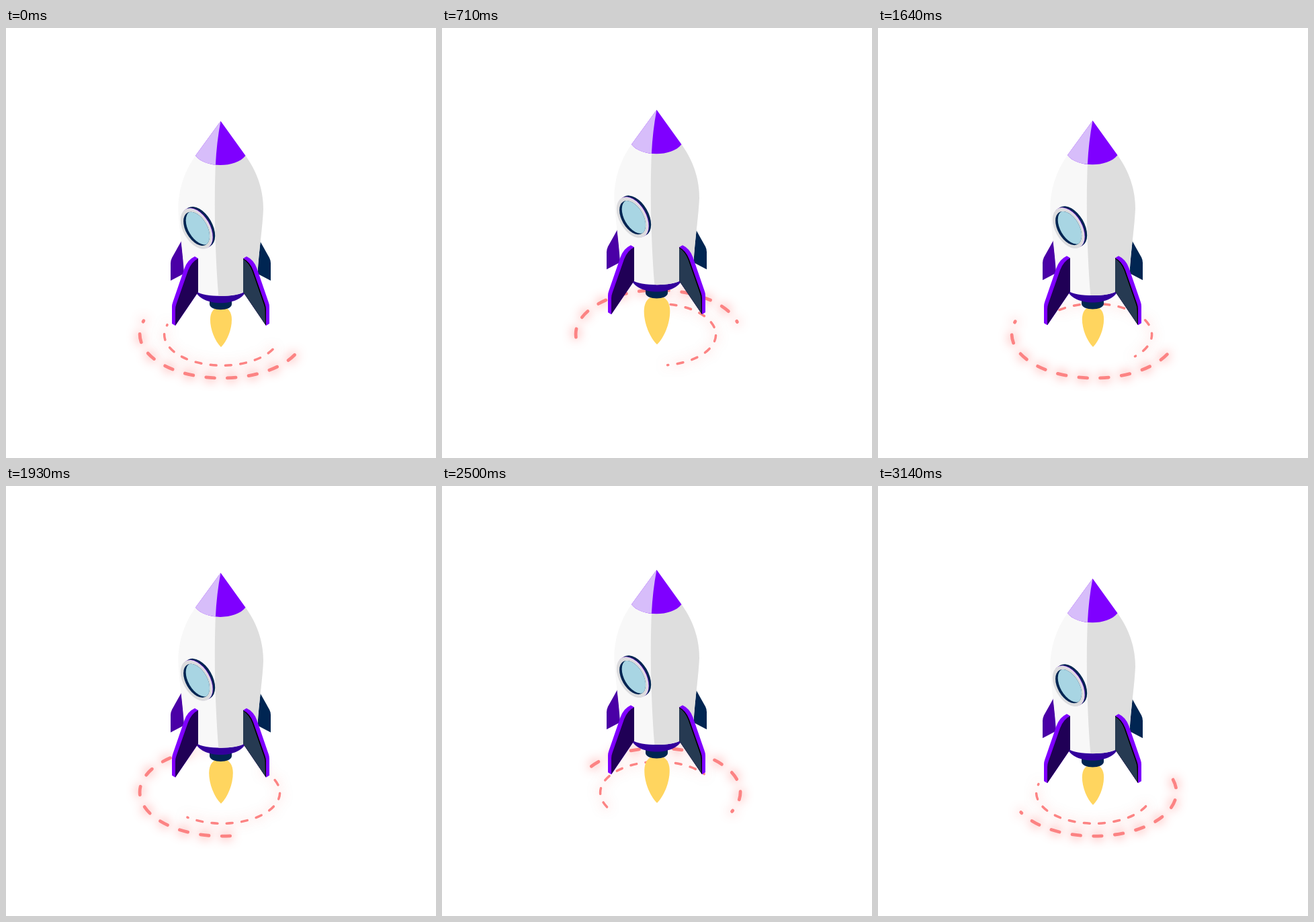
An HTML page with a canvas for the animation above (3210 ms loop, 640 px wide and 640 px high).

```html
<!DOCTYPE html>
<html lang="en">
<head>
<meta charset="utf-8">
<title>Rocket</title>
<style>
html, body { margin: 0; width: 100%; height: 100%; overflow: hidden; background: #fff; }
canvas { display: block; width: 640px; height: 640px; }
</style>
</head>
<body>
<canvas id="stage" width="640" height="640"></canvas>
<script>
const ctx = document.getElementById('stage').getContext('2d');
const LOOP = 3210, STEPS = 45, STEP = LOOP / STEPS, LEAD = 4;
const MID = 319.5, LIFT = 17;
const PURPLE = '#7f00ff', NAVY = '#002552';

function fill(color, d) {
  ctx.fillStyle = color;
  ctx.fill(new Path2D(d));
}

function mirrored(draw) {
  ctx.save();
  ctx.translate(2 * MID, 0);
  ctx.scale(-1, 1);
  draw();
  ctx.restore();
}

// Half a ring of dashes; turn is in degrees of arc length.
function ring(scale, cy, turn, width, glow) {
  const rx = 122.5 * scale, ry = 65.5 * scale;
  const h = ((rx - ry) / (rx + ry)) ** 2;
  const total = Math.PI * (rx + ry) * (1 + 3 * h / (10 + Math.sqrt(4 - 3 * h)));
  const pitch = total / 19, dash = 12.6 * scale, stub = 1.7 * scale;
  const pattern = [];
  for (let i = 0; i < 9; i++) pattern.push(dash, pitch - dash);
  pattern.push(stub, total - 9 * pitch - stub);

  ctx.save();
  ctx.lineWidth = width;
  ctx.lineCap = 'round';
  ctx.strokeStyle = '#fc8383';
  ctx.shadowColor = `rgba(248, 85, 80, ${glow})`;
  ctx.shadowBlur = 16;
  ctx.setLineDash(pattern);
  ctx.lineDashOffset = -(turn % 360) / 360 * total;
  ctx.beginPath();
  ctx.ellipse(321.6, cy, rx, ry, 0, 0, Math.PI * 2);
  ctx.stroke();
  ctx.restore();
}

function flame(lift) {
  ctx.save();
  ctx.translate(MID + 0.5, 413 - LIFT * lift);
  const size = 1 + 0.21 * lift;
  ctx.scale(size, size);
  fill('#ffd55f', 'M0 62 C-9 53 -16 36 -16 21 C-16 10 -11 2 0 2 C11 2 16 10 16 21 C16 36 9 53 0 62Z');
  ctx.restore();
}

function oval(x, y, a, b) {
  ctx.beginPath();
  ctx.ellipse(x, y, a, b, Math.PI / 3, 0, Math.PI * 2);
}

function porthole() {
  const disc = (color, x, y, a, b) => {
    oval(x, y, a, b);
    ctx.fillStyle = color;
    ctx.fill();
  };
  disc(NAVY, 287.6, 296.2, 33, 19.5);
  disc('#5a16a8', 284.7, 297.9, 33, 19.5);
  disc('#ead8f8', 284, 298.4, 33, 19.5);
  disc('#dcdcde', 283.2, 298.9, 32.8, 19.3);
  disc(NAVY, 283.6, 298.9, 27.5, 16);
  ctx.save();
  oval(283.6, 298.9, 27.5, 16);
  ctx.clip();
  disc('#a8d5e3', 287.2, 297.4, 27.5, 16);
  ctx.restore();
}

function backFin(color) {
  fill(color, 'M261 317 L247 342 Q245 346 245 350 L245 376 L266 365Z');
}

function frontFin(face, seam) {
  const inner = 'M286 343 Q276 348 271 361 L253.5 411 Q252 415 252 419 L252 443 L286 393Z';
  fill(PURPLE, 'M281 340 Q270 345 265.5 358 L248.3 408 Q247 411.5 247 415 L247 440 L252 443 L286 393 L286 343Z');
  if (seam) {
    fill(seam, inner);
    fill(face, 'M286 344 Q277 350 272.6 361.5 L255 412 Q253.5 416 253.5 420 L253 441.5 L286 393Z');
  } else {
    fill(face, inner);
  }
}

function rocket() {
  backFin('#4a00a6');
  mirrored(() => backFin(NAVY));

  fill(NAVY, 'M303 404 L303 411 C303 422 336 422 336 411 L336 404Z');
  fill('#33009c', 'M282 388 L282 392 C292 415 347 415 357 392 L357 388Z');

  fill('#f8f8f8', 'M356.5 190 C377 219 383 246 383 270 C381.5 300 376.5 330 374.5 365 L356.5 392 ' +
    'C343 401.2 296 401.2 282.5 392 L265 365 C263 330 257.5 300 256.3 270 C256.5 246 262 219 282 190Z');
  fill('#dedede', 'M312.2 195 C309.8 250 310.3 320 316.3 398.8 C332 399.2 347 397 356.5 392 L374.5 365 ' +
    'C376.5 330 381.5 300 383 270 C383 246 377 219 356.5 190Z');

  fill(PURPLE, 'M319.5 138.5 L282 190 C296 208.7 342 208.7 356.5 190Z');
  fill('#d7bdfa', 'M319.5 138.5 L282 190 C287.9 197.9 299.4 202.4 311.9 203.7 Q313.5 170 319.5 138.5Z');

  porthole();
  frontFin('#200056');
  mirrored(() => frontFin('#263a52', '#000'));
}

function draw(t) {
  const lift = 0.5 + 0.5 * Math.cos(2 * Math.PI * (t - 783) / 1505);
  ctx.fillStyle = '#fff';
  ctx.fillRect(0, 0, 640, 640);
  ring(1, 455.6, 20 + 0.219 * t, 4.8, 1);
  ring(0.702, 456.3, 20 + 0.3435 * t, 3.5, 0.5);
  flame(lift);
  ctx.save();
  ctx.translate(0, -LIFT * lift);
  rocket();
  ctx.restore();
}

const start = performance.now();
function tick() {
  const t = Math.max(0, performance.now() - start) % LOOP;
  const step = Math.min(STEPS - 1, Math.floor((t + 5) / STEP));
  draw(step * STEP + LEAD);
  requestAnimationFrame(tick);
}
tick();
</script>
</body>
</html>
```
